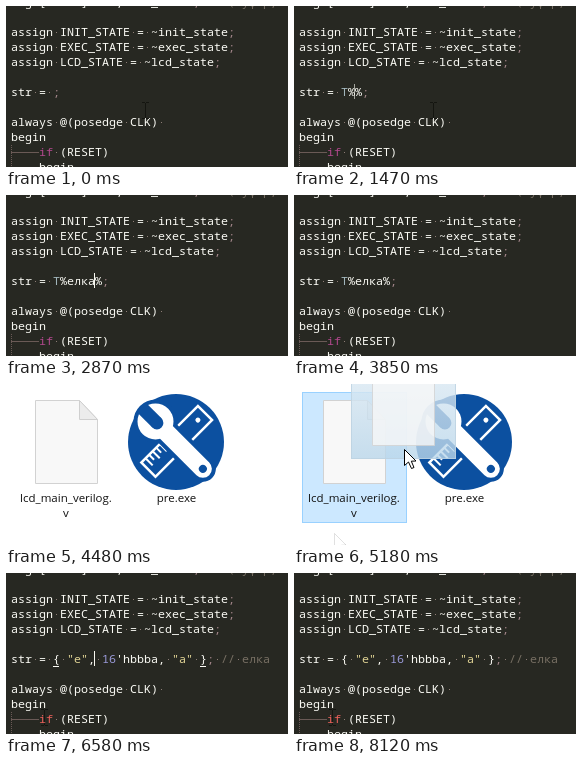
Write an HTML page with a canvas that moves like this. It is 282 by 161 pixels and loops after 8330 ms.

```html
<!DOCTYPE html>
<html lang="ru">
<head>
<meta charset="utf-8">
<style>
  html, body { margin: 0; width: 100%; height: 100%; overflow: hidden; background: #272822; }
  canvas { display: block; }
</style>
</head>
<body>
<canvas id="stage" width="282" height="161"></canvas>
<script>
const ctx = document.getElementById('stage').getContext('2d');
const LOOP = 8330, W = 282, H = 161;
const LEFT = 4, COL = 7, LINE = 15, STR_TOP = 78;
const MONO = '11.667px "Noto Sans Mono", "DejaVu Sans Mono", monospace';
const LABEL = '11.5px "Open Sans", "Noto Sans", sans-serif';
const INK = '#fcfcf6', STRING = '#e2d596', NUMBER = '#9c9cdc', COMMENT = '#787064';
const SEMICOLON = '#a3868a', KEYWORD = '#b0488c', KEYWORD_HOVER = '#e8605a', ODD_LETTER = '#a2b6bc';
const DOT = '#8d7d76', DASH = '#6a5a56', BEAM = '#141510';
const BLUE = '#0c50a0';

// Latest entry whose start time has passed.
const at = (steps, t) => steps.filter(s => s[0] <= t).pop();

// start, typed text, caret column, caret opacity, suggestion state
const typing = [
  [0, '', 6, 0],
  [140, '', 6, .5],
  [280, '', 6, 1],
  [420, 'T', 7, 1],
  [700, 'T%', 8, 1],
  [910, 'T%%', 9, 1],
  [1120, 'T%%', 8, 1],
  [1470, 'T%%', 8, .6],
  [1540, 'T%%', 8, .3],
  [1610, 'T%%', 8, 0],
  [2030, 'T%е%', 9, 1],
  [2100, 'T%е%', 9, 1, 'many'],
  [2170, 'T%ел%', 10, 1, 'many'],
  [2450, 'T%елк%', 11, 1, 'one'],
  [2870, 'T%елка%', 12, 1],
  [3220, 'T%елка%', 12, .6],
  [3290, 'T%елка%', 12, .3],
  [3360, 'T%елка%', 12, 0],
  [3500, 'T%елка%', 12, .5],
  [3570, 'T%елка%', 12, 1],
  [3850, 'T%елка%', 12, 0]
];
const suggestions = {
  many: ['Определение', 'переключающего', 'Переключение', 'пересылаемого'],
  one: ['переделка']
};

// start, caret opacity while the converted line is shown
const resultCaret = [
  [6580, 1], [6930, .6], [7000, .3], [7070, 0],
  [7490, .3], [7560, .6], [7630, 1],
  [7910, .6], [7980, .3], [8120, 0]
];

// start, x, y of the pointer tip
const pointer = [
  [4620, 40, 149], [4690, 54, 112], [4760, 60, 80], [4900, 62, 72],
  [4970, 70, 69], [5040, 82, 67], [5110, 96, 66], [5180, 110, 65],
  [5250, 140, 66], [5320, 168, 68]
];

function rect(x, y, w, h, fill, stroke) {
  ctx.fillStyle = fill;
  ctx.fillRect(x, y, w, h);
  if (!stroke) return;
  ctx.strokeStyle = stroke;
  ctx.lineWidth = 1;
  ctx.strokeRect(x + .5, y + .5, w - 1, h - 1);
}

function shape(points, fill, stroke) {
  ctx.beginPath();
  points.forEach(([x, y]) => ctx.lineTo(x, y));
  ctx.closePath();
  ctx.fillStyle = fill;
  ctx.fill();
  ctx.strokeStyle = stroke;
  ctx.lineWidth = 1;
  ctx.stroke();
}

function disc(x, y, r, fill) {
  ctx.fillStyle = fill;
  ctx.beginPath();
  ctx.arc(x, y, r, 0, 2 * Math.PI);
  ctx.fill();
}

function faded(alpha, draw) {
  ctx.save();
  ctx.globalAlpha = alpha;
  draw();
  ctx.restore();
}

// Spaces become dots and tabs become dashes, as in an editor that shows whitespace.
function code(text, top, col = 0, color = INK) {
  ctx.font = '500 ' + MONO;
  ctx.textAlign = 'left';
  for (const ch of text) {
    const x = LEFT + col * COL;
    if (ch === '\t') {
      rect(x + 1, top + 8, 4 * COL, 1, DASH);
      col += 4;
      continue;
    }
    if (ch === ' ') rect(x + 4, top + 8, 1, 1, DOT);
    ctx.fillStyle = ch === ';' ? SEMICOLON : color;
    ctx.fillText(ch, x + 1, top + 12);
    col++;
  }
  return col;
}

// Parts are [text, color] pairs set one after another.
function codeParts(parts, top, col = 0) {
  for (const [text, color] of parts) col = code(text, top, col, color);
}

function iBeam(x, y) {
  rect(x, y - 7, 1, 15, BEAM);
  for (const end of [y - 8, y + 8]) {
    rect(x - 3, end, 3, 1, BEAM);
    rect(x + 1, end, 3, 1, BEAM);
  }
}

function arrow(x, y) {
  const outline = [[0, 0], [0, 16], [4, 12.5], [7, 19], [9.5, 18], [6.8, 11.7], [11.5, 11.5]];
  shape(outline.map(([dx, dy]) => [x + dx + .5, y + dy + .5]), '#fff', '#000');
}

function caret(col, alpha) {
  faded(alpha, () => rect(LEFT + col * COL, STR_TOP, 1, LINE, '#f8f8f0'));
}

function popup(items) {
  const row = 17, x = 55, y = 94;
  rect(x, y, W - x + 2, items.length * row + 2, '#fbfbfb', '#8a8d92');
  rect(x + 1, y + 1, W - x, row, '#abc7e9');
  items.forEach((word, i) => [...word].forEach((ch, n) => {
    ctx.font = (n === 0 || ch === 'л' ? 'bold ' : '') + MONO;
    ctx.fillStyle = '#111';
    ctx.fillText(ch, 61 + n * COL, y + 13 + i * row);
  }));
}

function editor(t) {
  const converted = t >= 6580;
  rect(0, 0, W, H, '#272822');
  for (let y = 139; y < H; y += 2) rect(5, y, 1, 1, DASH);

  const listing = [
    [18, 'assign INIT_STATE = ~init_state;'],
    [33, 'assign EXEC_STATE = ~exec_state;'],
    [48, 'assign LCD_STATE = ~lcd_state;'],
    [108, 'always @(posedge CLK) '],
    [123, 'begin'],
    [153, '\tbegin']
  ];
  codeParts([['reg [127:0] str, lcd_state; '], ['// (буфер, вывод)', COMMENT]], -12);
  listing.forEach(([top, text]) => code(text, top));

  if (converted) iBeam(38, 144);
  codeParts([['\t'], ['if', converted ? KEYWORD_HOVER : KEYWORD], [' (RESET)']], 138);
  const col = code('str = ', STR_TOP);

  if (converted) {
    codeParts([
      ['{ '], ['"e"', STRING], [', '], ['16', NUMBER], ["'hbbba, "], ['"a"', STRING],
      [' }; '], ['// елка', COMMENT]
    ], STR_TOP, col);
    caret(12, at(resultCaret, t)[1]);
    if (t < 8120) for (const c of [6, 27]) rect(LEFT + c * COL + 1, 93, COL - 1, 1, INK);
    return;
  }

  const [, text, caretCol, alpha, list] = at(typing, t);
  codeParts([[text.slice(0, 1), ODD_LETTER], [text.slice(1) + ';']], STR_TOP, col);
  caret(caretCol, alpha);
  if (list) {
    popup(suggestions[list]);
    arrow(137, 105);
  } else if (t < 2100) {
    iBeam(139, 104);
  }
}

function page() {
  shape([[29.5, 16.5], [73.5, 16.5], [91.5, 35.5], [91.5, 99.5], [29.5, 99.5]], '#f8f8f8', '#d2d2d2');
  shape([[73.5, 16.5], [73.5, 35.5], [91.5, 35.5]], '#ececec', '#cfcfcf');
}

function toolIcon() {
  disc(170, 58, 48, BLUE);
  ctx.save();
  ctx.translate(170, 58);

  ctx.save();
  ctx.rotate(-Math.PI / 4);
  ctx.strokeStyle = '#fff';
  ctx.lineWidth = 2.5;
  ctx.strokeRect(-39, -10, 80, 20);
  for (let x = -34; x < -10; x += 5) rect(x, -10, 2, x % 2 ? 7 : 10, '#fff');
  disc(31, 0, 2.5, '#fff');
  ctx.restore();

  ctx.rotate(Math.PI / 4);
  const wrench = (grow, color) => {
    disc(-29, 0, 18 + grow, color);
    ctx.beginPath();
    ctx.roundRect(-25, -9 - grow, 72 + grow, 18 + 2 * grow, 9 + grow);
    ctx.fill();
  };
  wrench(4, BLUE);
  wrench(0, '#fff');
  rect(-49, -6.5, 22, 13, BLUE);
  disc(-27, 0, 6.5, BLUE);
  disc(38, 0, 4, BLUE);
  ctx.restore();
}

function label(text, x, y) {
  ctx.font = LABEL;
  ctx.textAlign = 'center';
  ctx.fillStyle = '#111';
  ctx.fillText(text, x, y);
}

function dragImage(x, y) {
  faded(.8, () => {
    const shade = ctx.createLinearGradient(0, y - 95, 0, y + 10);
    shade.addColorStop(0, '#e4eef5');
    shade.addColorStop(1, '#b9d6ea');
    rect(x - 53, y - 95, 105, 105, shade, '#bdd3e2');
    ctx.translate(x - 61, y - 103);
    page();
  });
}

function dropHint(x, y) {
  rect(x, y, W - x + 2, 20, '#fff', '#bababa');
  ctx.font = LABEL;
  ctx.textAlign = 'left';
  ctx.fillStyle = '#1a4a9c';
  ctx.fillText('Открыть с помощью', x + 6, y + 14);
}

function folder(t) {
  rect(0, 0, W, H, '#fff');
  if (t >= 4900) rect(8, 8, 105, 131, '#cce8ff', '#99d1ff');
  else if (t >= 4690) rect(8, 8, 105, 131, '#e5f3ff');
  if (t >= 5250 && t < 6020) {
    faded(t < 5950 ? 1 : .5, () => rect(118, 8, 105, 116, '#d9eeff', '#a8d8ff'));
  }
  page();
  toolIcon();
  label('lcd_main_verilog.', 60, 118);
  label('v', 60, 133);
  label('pre.exe', 170.5, 118);

  if (t >= 4690) faded(.12, () => arrow(40, 149));
  if (t < 4620 || t >= 5950) return;
  const [, x, y] = at(pointer, t);
  if (t >= 4970 && t < 5670) dragImage(x, y);
  if (t >= 5320 && t < 5670) dropHint(x + 14, y + 24);
  arrow(x, y);
}

function frame(now) {
  const t = now % LOOP;
  (t >= 4480 && t < 6580 ? folder : editor)(t);
  requestAnimationFrame(frame);
}
requestAnimationFrame(frame);
</script>
</body>
</html>
```
